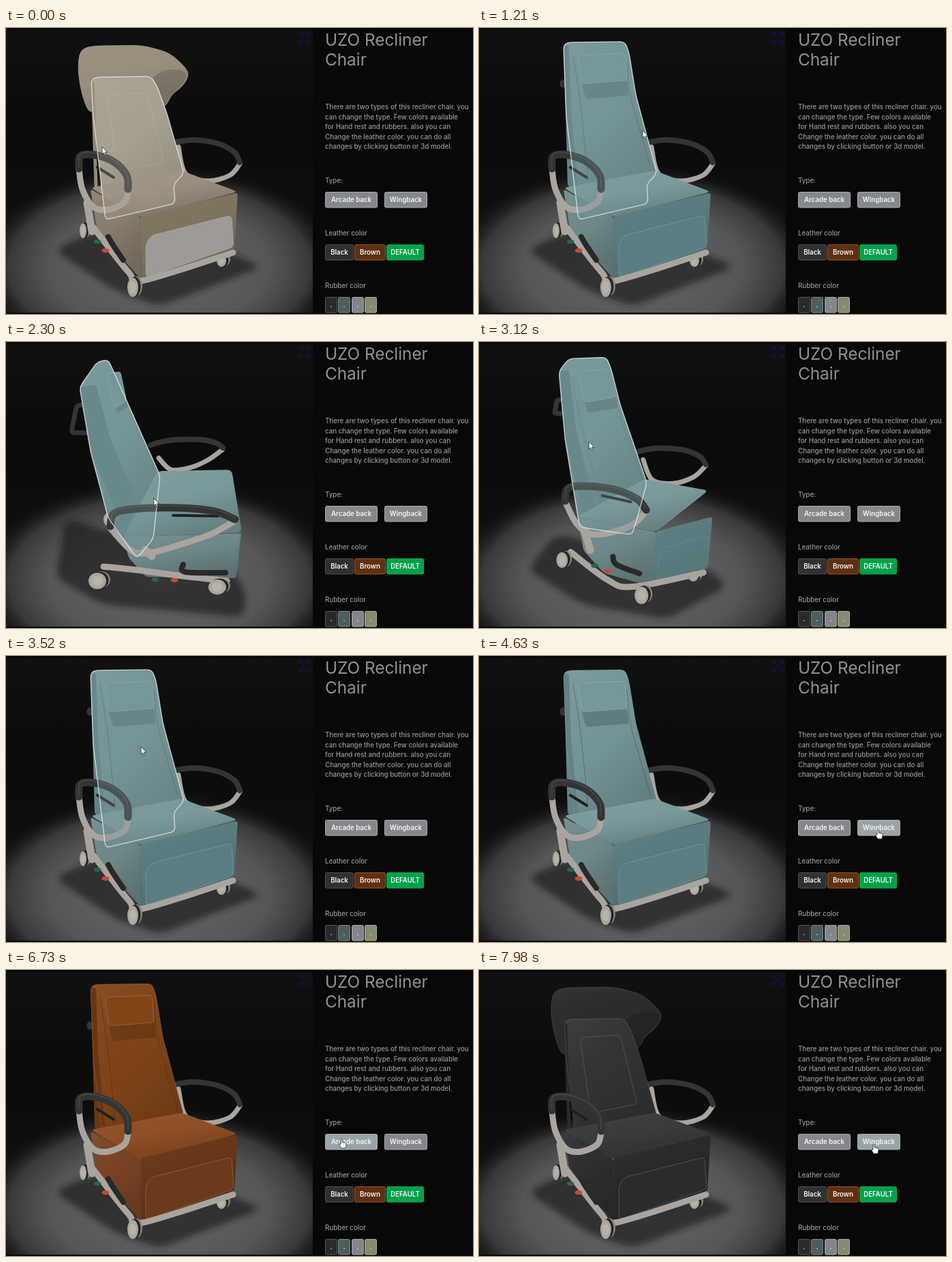
An HTML page for the animation above (8 s loop, 685 px wide and 419 px high).

```html
<!DOCTYPE html>
<html lang="en">
<head>
<meta charset="utf-8">
<title>Recliner configurator</title>
<style>
  html, body { margin: 0; width: 100%; height: 100%; overflow: hidden; background: #080808; }
  svg { display: block; width: 685px; height: 419px; }
  text { font-family: Inter, "Open Sans", sans-serif; font-weight: 500; font-size: 9.75px; fill: #999; }
  .title { font-weight: 400; font-size: 24.3px; fill: #929292; }
  .btn { fill: #f4f4f4; text-anchor: middle; font-weight: 600; font-size: 9.7px; }
</style>
</head>
<body>
<svg viewBox="0 0 685 419">
  <defs>
    <clipPath id="view"><rect y="3" width="450" height="414"/></clipPath>
    <linearGradient id="wall" x2="0" y2="1">
      <stop stop-color="#111"/><stop offset=".35" stop-color="#0b0b0b"/><stop offset="1" stop-color="#141414"/>
    </linearGradient>
    <radialGradient id="spot">
      <stop stop-color="#686868"/><stop offset=".6" stop-color="#565656"/>
      <stop offset=".82" stop-color="#393939"/><stop offset="1" stop-color="#111" stop-opacity="0"/>
    </radialGradient>
    <linearGradient id="shade" x2=".5" y2="1">
      <stop stop-color="#fff" stop-opacity=".06"/><stop offset=".5" stop-color="#000" stop-opacity=".02"/>
      <stop offset="1" stop-color="#000" stop-opacity=".18"/>
    </linearGradient>
    <filter id="soft" x="-20%" y="-20%" width="140%" height="140%"><feGaussianBlur stdDeviation="5"/></filter>
  </defs>
  <rect width="685" height="419" fill="#080808"/>
  <g clip-path="url(#view)">
    <rect y="3" width="450" height="414" fill="url(#wall)"/>
    <ellipse cx="225" cy="350" rx="270" ry="150" fill="url(#spot)"/>
    <g id="chair" stroke-linecap="round" stroke-linejoin="round"></g>
    <path d="M431 12V7h5M441 7h5v5M446 18v5h-5M436 23h-5v-5M432 8l5 5M445 8l-5 5M445 22l-5-5M432 22l5-5" fill="none" stroke="#11113f" stroke-width="2"/>
  </g>
  <g id="copy"></g>
  <g id="buttons"></g>
  <g id="cursor" stroke="#222" stroke-width=".8" stroke-linejoin="round" fill="#fff">
    <path id="arrow" d="M0 0v11l2.5-2.3 1.7 3.8 1.8-.8-1.7-3.7h3.4z"/>
    <path id="hand" d="M-1 1.2Q0-.6 1.2 1.2V5l5 1.3Q7.4 7 7 9L6 14H0L-3.4 8.8Q-3.5 7-1 8.4z"/>
  </g>
</svg>
<script>
const $ = id => document.getElementById(id);
const LOOP = 8000;

const copy = [
  [26, "UZO Recliner", "title"], [55, "Chair", "title"],
  [119, "There are two types of this recliner chair. you"],
  [133.5, "can change the type. Few colors available"],
  [148, "for Hand rest and rubbers. also you can"],
  [162.5, "Change the leather color. you can do all"],
  [177, "changes by clicking button or 3d model."],
  [227, "Type:"], [304, "Leather color"], [381, "Rubber color"]
];
$("copy").innerHTML = copy.map(([y, s, c = ""]) => `<text x="468" y="${y}" class="${c}">${s}</text>`).join("");

// x, y, width, label, fill, border, hover fill
const buttons = [
  [468, 240, 77, "Arcade back", "#85878c", "#a9adb1", "#98a5a8"],
  [555, 240, 63, "Wingback", "#85878c", "#a9adb1", "#98a5a8"],
  [468, 317, 42, "Black", "#303030", "#505050", "#5b5b5b"],
  [511, 317, 46, "Brown", "#5f3010", "#9a5523", "#74401c"],
  [558, 317, 55, "DEFAULT", "#00a14b", "#0aa957", "#12b35f"],
  [468, 394, 18, ".", "#2a2a2a", "#565656", "#444"],
  [487, 394, 18, ".", "#4c5f60", "#728a8b", "#667"],
  [507, 394, 18, ".", "#83858d", "#a6a8ae", "#99a"],
  [526, 394, 18, ".", "#888a70", "#abad91", "#998"]
];

// Each part is outlined in three poses: front, side, rear.
const raw = {
  shadow: ["70,325 130,298 330,330 376,350 225,408 160,385", "72,345 88,258 330,330 352,365 350,403 142,385", "72,340 140,310 300,290 390,325 310,372 195,405"],
  back: ["124,26 130,21 214,20 220,36 230,98 261,213 246,229 248,257 146,281 128,130",
    "108,66 134,29 150,26 158,44 176,84 226,196 216,288 192,317 150,258 124,160",
    "120,46 127,38 146,34 192,58 203,120 271,250 250,316 238,319 170,255 132,130"],
  side: ["124,26 132,25 135,120 146,238 130,232 127,120", "109,66 132,62 152,140 214,285 190,316 126,165", "183,56 196,62 217,160 270,255 243,317 204,170"],
  pillow: ["145,40 214,37 217,77 151,82", "147,46 168,43 177,86 160,98", "197,66 211,70 217,112 203,122"],
  under: ["150,80 217,76 220,99 157,104", "160,96 177,86 180,94 164,104", "203,112 216,112 214,118 204,122"],
  seam: ["138,40 148,105 156,180 160,224", "134,66 150,130 180,190 208,240", "190,62 208,150 230,210 244,300"],
  edge: ["217,50 222,98 236,150 252,205", "172,60 178,95 200,150 222,195", "196,62 217,160 240,210 268,250"],
  top: ["124,234 258,209 340,240 197,277", "172,286 222,189 331,187 346,279", "268,262 218,195 277,169 369,224"],
  box: ["124,236 197,277 199,369 168,335 134,298", "172,286 345,280 337,346 205,344 180,316", "262,262 368,224 359,292 262,335 246,318"],
  front: ["197,276 340,241 335,324 199,369", "344,280 346,276 338,343 336,346", "368,224 369,224 360,291 359,292"],
  panel: ["205,316 213,304 331,274 334,321 205,366", "344,310 344,300 345,295 337,342 336,344", "365,250 366,245 367,240 360,290 359,291"],
  rail: ["128,292 180,358 201,370 333,329", "143,329 200,335 260,343 324,350", "207,358 240,340 275,322 300,312"],
  farRail: ["210,340 300,330", "200,330 300,338", "140,273 190,262"],
  handle: ["123,79 122,80 122,82 122,83 123,84 124,84", "112,92 104,95 100,112 97,131 108,133 118,133", "109,108 124,107 140,117 150,135 160,141 181,137"],
  farPad: ["251,167 275,164 310,169 335,182 343,197", "212,151 240,144 285,143 308,148 318,155", "216,150 225,143 240,137 253,135 262,140"],
  farArm: ["343,199 328,216 295,224 263,213 253,174", "317,158 296,173 270,184 242,187 224,170", "262,142 256,156 238,173 222,190 205,190"],
  pad: ["107,206 109,188 130,186 158,196 177,216 179,236", "153,270 158,252 185,245 250,243 305,248 336,260", "239,270 244,240 266,215 302,199 340,192 370,198"],
  arm: ["179,236 174,255 150,266 128,262 112,236 107,206", "336,262 300,282 255,297 215,308 185,306 154,274", "371,199 362,225 335,255 305,278 270,292 241,270"],
  post: ["119,256 126,298", "204,304 214,314", "262,291 282,298"],
  grip: ["134,204 158,219", "245,254 311,255", "317,217 362,203"],
  lever: ["150,306 157,318 172,340", "260,326 263,337 322,338", "311,298 335,290 364,281"],
  red: ["146,326", "247,349", "306,324"],
  green: ["134,313", "219,348", "285,335"],
  // centre, then radii
  rearNear: ["113,297 5,11", "134,350 13,12", "200,382 14,15"],
  frontNear: ["186,380 8,14", "310,359 13,11", "342,313 11,11"],
  frontFar: ["316,341 7,9", "312,345 8,7", "310,260 5,5"],
  rearFar: ["205,330 5,8", "149,260 6,9", "132,302 12,13"]
};
const points = s => s.split(" ").map(q => q.split(",").map(Number));
const parts = Object.fromEntries(Object.entries(raw).map(([k, v]) => [k, v.map(points)]));
const wingTop = points("125,77 132,72 212,71 221,84 236,125");
const wing = points("105,62 108,32 126,26 200,25 240,36 266,60 268,72 257,88 243,97 236,113 226,117 212,90 132,84 130,121 121,124 111,98");
const wingInner = points("212,72 236,60 262,62 266,73 255,87 242,96 235,113 227,116");

// back, side, seat top, seat side, seat front, front panel
const leather = {
  beige: ["#a9a393", "#938674", "#9b9080", "#8b7f70", "#817661", "#9d9a97"],
  teal: ["#769799", "#638285", "#7d9d9f", "#718b8d", "#5c7e82", "#5c7e82"],
  brown: ["#824518", "#693613", "#935126", "#7d4526", "#693718", "#6b391b"],
  black: ["#333436", "#292a2c", "#3b3c3e", "#2f3032", "#292a2c", "#2b2c2e"]
};

// time, value
const turn = [[0, 0], [1280, 0], [1700, 2], [1850, 2], [2100, 1.25], [2140, 1.25], [2300, 1], [2910, .55], [3000, .55], [3520, 0]];
const pointer = [
  [0, 141, 174], [480, 141, 174], [800, 150, 152], [1210, 240, 150], [1300, 240, 150], [1700, 155, 165], [1850, 153, 167],
  [2100, 196, 212], [2300, 217, 229], [2910, 150, 150], [3000, 150, 150], [3520, 198, 133], [3780, 198, 133],
  [4200, 500, 225], [4460, 585, 254], [5300, 585, 254], [5420, 510, 256], [5580, 485, 327], [5780, 485, 327],
  [6080, 530, 329], [6200, 530, 329], [6600, 500, 262], [6730, 492, 247], [6930, 492, 247],
  [7200, 479, 326], [7440, 479, 328], [7600, 575, 270], [7780, 577, 262], [7900, 579, 255]
];
const types = [[0, "wing"], [480, "arcade"], [4680, "wing"], [5420, "arcade"], [7820, "wing"]];
const colors = [[0, "beige"], [820, "teal"], [5760, "black"], [6160, "brown"], [7220, "black"]];

const lerp = (a, b, k) => a + (b - a) * k;
const stepAt = (keys, t) => keys.filter(k => k[0] <= t).pop()[1];
function valueAt(keys, t) {
  const i = keys.findIndex(k => k[0] > t);
  if (i < 0) return keys[keys.length - 1].slice(1);
  const a = keys[i - 1], b = keys[i], k = (t - a[0]) / (b[0] - a[0]);
  return a.slice(1).map((v, n) => lerp(v, b[n + 1], k));
}

function rounded(pts, r) {
  const toward = (b, a) => {
    const k = Math.min(.5, r / (Math.hypot(a[0] - b[0], a[1] - b[1]) || 1));
    return [lerp(b[0], a[0], k), lerp(b[1], a[1], k)];
  };
  const n = pts.length;
  return "M" + pts.map((b, i) => `${toward(b, pts[(i + n - 1) % n])}Q${b} ${toward(b, pts[(i + 1) % n])}`).join("L") + "Z";
}
function curve(pts) {
  let d = "M" + pts[0];
  for (let i = 0; i < pts.length - 1; i++) {
    const b = pts[i], c = pts[i + 1], a = pts[i - 1] || b, e = pts[i + 2] || c;
    const near = [0, 1].map(n => b[n] + (c[n] - a[n]) / 6), far = [0, 1].map(n => c[n] - (e[n] - b[n]) / 6);
    d += `C${near} ${far} ${c}`;
  }
  return d;
}
const fill = (pts, color, r = 5, more = "") => `<path d="${rounded(pts, r)}" fill="${color}" ${more}/>`;
const line = (pts, color, w, more = "") => `<path d="${curve(pts)}" fill="none" stroke="${color}" stroke-width="${w}" ${more}/>`;
const oval = (x, y, rx, ry, color) => `<ellipse cx="${x}" cy="${y}" rx="${rx}" ry="${ry}" fill="${color}"/>`;

function chair(p, type, color, hover) {
  const seg = p < 1 ? 0 : 1, k = Math.min(p - seg, 1);
  const get = name => parts[name][seg].map((a, i) => a.map((v, n) => lerp(v, parts[name][seg + 1][i][n], k)));
  const [backC, sideC, topC, boxC, frontC, panelC] = leather[color];
  const metal = "#aaa49e", rubber = "#343434", isWing = type === "wing";
  const face = `opacity="${Math.max(0, 1 - p).toFixed(2)}"`;
  const lit = (pts, c, r) => fill(pts, c, r) + fill(pts, "url(#shade)", r);
  const stitch = `${face} stroke-opacity=".3"`;

  const wheel = name => {
    const [[x, y], [rx, ry]] = get(name);
    return oval(x + 6, y - 2, rx, ry, "#898580") + oval(x + 3, y - 1, rx + .5, ry + .5, "#252525")
      + oval(x, y, rx, ry, "#aaa69c") + oval(x, y, rx * .62, ry * .62, "#b8b2a7");
  };
  const dot = (name, c) => oval(...get(name)[0], 5.5, 3.3, c);

  const shape = get("back");
  if (isWing) wingTop.forEach((q, i) => shape[i] = q);

  const pillow = isWing ? "" : fill(get("under"), "#000", 4, 'opacity=".16"')
    + fill(get("pillow"), backC, 5, `stroke="#fff" stroke-opacity=".16"`);
  let back = "";
  if (isWing) back += lit(wing, sideC, 14) + fill(wing, backC, 14, 'opacity=".35" stroke="#ddd" stroke-opacity=".4"')
    + fill(wingInner, "#000", 12, 'opacity=".14"');
  back += lit(shape, backC, 7);
  if (isWing) back += line(points("127,80 129,140 132,232"), sideC, 5)
    + fill(points("148,99 207,95 232,196 164,210"), "none", 7, 'stroke="#fff" stroke-opacity=".15"');
  else back += fill(get("side"), sideC, 5) + line(get("seam"), "#162022", 1, stitch) + line(get("edge"), "#162022", 1, stitch);
  back += fill(shape, "none", 7, 'stroke="#fff" stroke-opacity=".13"');

  const seat = lit(get("box"), boxC, 4) + lit(get("top"), topC, 7) + lit(get("front"), frontC, 5)
    + fill(get("panel"), panelC, 7, `${face} stroke="#ddd" stroke-opacity=".22"`);
  const base = line(get("rail"), metal, 9) + dot("green", "#286448") + dot("red", "#c9463c")
    + line(get("lever"), "#292929", 8) + wheel("rearNear") + wheel("frontNear");
  const farSide = fill(get("shadow"), "#151515", 18, 'opacity=".62" filter="url(#soft)"')
    + wheel("frontFar") + wheel("rearFar") + line(get("farRail"), metal, 11)
    + line(get("farArm"), metal, 7) + line(get("farPad"), rubber, 8);
  const handle = line(get("handle"), rubber, 7);
  const arm = line(get("post"), metal, 11) + line(get("arm"), metal, 9) + line(get("grip"), "#202020", 4)
    + line(get("pad"), rubber, 11) + line(get("pad").map(([x, y]) => [x, y - 3]), "#555", 1.5, 'opacity=".6"');
  const glow = hover ? fill(shape, backC, 7, 'fill-opacity=".32" stroke="#e8eeee" stroke-opacity=".75" stroke-width="1.4"') : "";

  return farSide + (p < 1.2 ? handle + back + pillow + seat + base : pillow + seat + base + back + handle) + arm + glow;
}

function draw(t) {
  const [x, y] = valueAt(pointer, t);
  const over = ([bx, by, w]) => x >= bx && x <= bx + w && y >= by && y <= by + 23;
  $("chair").innerHTML = chair(valueAt(turn, t)[0], stepAt(types, t), stepAt(colors, t), t < 3840);
  $("buttons").innerHTML = buttons.map(b => {
    const [bx, by, w, label, base, border, hot] = b;
    return `<rect x="${bx + .5}" y="${by + .5}" width="${w - 1}" height="22.5" rx="2" fill="${over(b) ? hot : base}" stroke="${border}"/>`
      + `<text class="btn" x="${bx + w / 2}" y="${by + 15.3}">${label}</text>`;
  }).join("");
  const hand = buttons.some(over);
  $("arrow").style.display = hand ? "none" : "";
  $("hand").style.display = hand ? "" : "none";
  $("cursor").setAttribute("transform", `translate(${x.toFixed(1)} ${y.toFixed(1)})`);
}

const start = performance.now();
function tick() {
  draw((performance.now() - start) % LOOP);
  requestAnimationFrame(tick);
}
tick();
</script>
</body>
</html>
```
